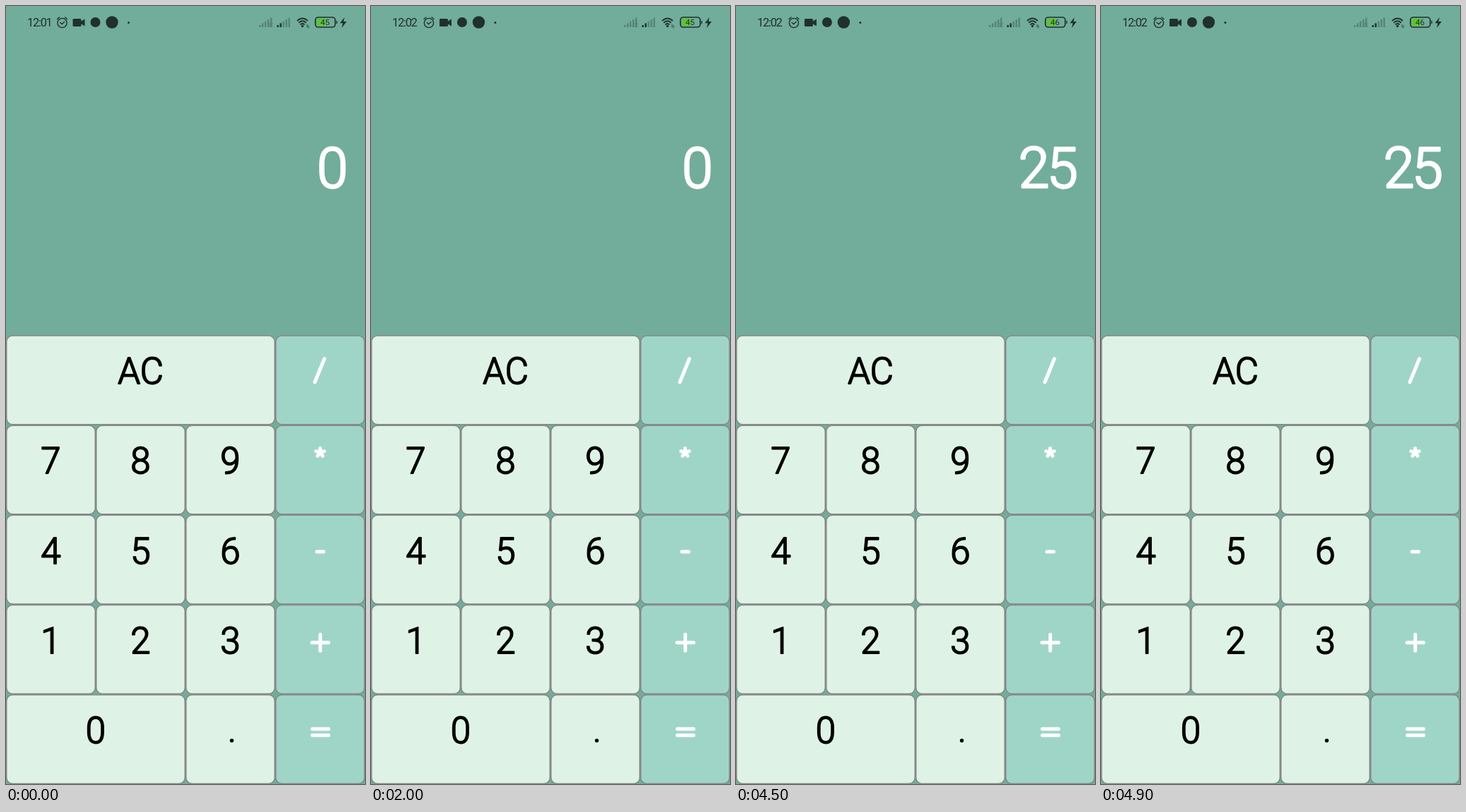
An HTML page that plays this animation: 508 px wide and 1102 px high, repeating every 5 s.

```html
<!DOCTYPE html>
<html lang="en">
<head>
<meta charset="utf-8">
<title>Calculator</title>
<style>
  html, body { margin: 0; width: 100%; height: 100%; overflow: hidden; background: #71ad9a; }
  svg { display: block; width: 100vw; height: 100vh; }
  text { font-family: Roboto, "Liberation Sans", sans-serif; font-weight: 300; }
  .face { stroke: #878787; stroke-width: 1.5; }
  .label { font-size: 51px; text-anchor: middle; fill: #000; stroke: #000; stroke-width: 1.8; stroke-linejoin: round; }
  .op { fill: none; stroke: #fff; stroke-width: 5; stroke-linecap: round; stroke-linejoin: round; }
  #display { font-size: 79px; text-anchor: end; letter-spacing: -3.4px; fill: #fff; stroke: #fff; stroke-width: 2.8; stroke-linejoin: round; }
  #clock { font-size: 16.5px; font-weight: 400; letter-spacing: -1.3px; }
  #charge { font-size: 11.5px; font-weight: 400; text-anchor: middle; }
  .ink { fill: #20312c; }
  .line { fill: none; stroke: #20312c; stroke-width: 1.4; stroke-linecap: round; stroke-linejoin: round; }
  .faint { fill: #548475; }
</style>
</head>
<body>
<svg id="stage" viewBox="0 0 508 1102" preserveAspectRatio="none">
  <rect width="508" height="1102" fill="#71ad9a"/>
  <g id="status">
    <text id="clock" class="ink" x="30" y="29"></text>
    <g id="icons">
      <g class="line">
        <circle cx="79.5" cy="24" r="6.6"/>
        <path d="M72.5 18.5L75.5 16M86.5 18.5L83.5 16M76.7 23.5L79.2 25.8L82.6 22.6"/>
      </g>
      <path class="ink" d="M96 18H105Q106.500 18 106.500 19.500V21.500L111.500 18.500V28.500L106.500 25.500V27.500Q106.500 29 105 29H96Q94.500 29 94.500 27.500V19.500Q94.500 18 96 18Z"/>
      <circle class="ink" cx="126.500" cy="23" r="7"/>
      <circle class="ink" cx="150" cy="23" r="8.700"/>
      <circle class="ink" cx="173.500" cy="23.500" r="1.500"/>
    </g>
    <g id="bars"></g>
    <path class="line" stroke-width="1" d="M373 25L377 29M377 25L373 29" style="stroke:#548475"/>
    <g class="line" stroke-linecap="butt">
      <path d="M412.500 20.500Q419.500 14.500 426.500 20.500M414.800 23.300Q419.500 19.300 424.200 23.300M417 26Q419.500 24 422 26" style="stroke-width:1.8"/>
      <path d="M426 26.500V30M428 27.500V31" style="stroke-width:.8"/>
    </g>
    <circle class="ink" cx="419.500" cy="28.500" r="1.700"/>
    <rect x="440" y="18" width="13" height="10" rx="2" fill="#5cc52d"/>
    <rect class="line" x="437.800" y="16" width="28" height="14" rx="4" style="stroke-width:1.7"/>
    <path class="line" d="M468 21.500V24.500"/>
    <text id="charge" class="ink" x="451.500" y="27"></text>
    <path class="ink" d="M479 16L472.500 24.200H476.500L475.200 31L482 22H477.600Z"/>
  </g>
  <text id="display" x="480.500" y="257"></text>
  <g id="keys"></g>
</svg>
<script>
const LOOP = 5000, COL = 127, ROW = 127.2, TOP = 466.2;
const $ = id => document.getElementById(id);

function add(parent, tag, attrs, text) {
  const el = document.createElementNS(parent.namespaceURI, tag);
  for (const name in attrs) el.setAttribute(name, attrs[name]);
  if (text) el.textContent = text;
  parent.append(el);
  return el;
}

// Operator strokes, relative to the middle of the label line.
const star = [0, 1, 2, 3, 4].map(i => {
  const a = (i * 72 - 90) * Math.PI / 180;
  return `M0 -11L${6 * Math.cos(a)} ${-11 + 6 * Math.sin(a)}`;
}).join('');
const strokes = {
  '/': 'M-7.500 16.500L6 -16.500',
  '*': star,
  '-': 'M-4.500 2.500H5',
  '+': 'M-11.500 4H12M.2 -7.500V15.500',
  '=': 'M-11 -1H12M-11 8H12'
};

const keys = {};
function addKey(name, col, row, span = 1) {
  const x = col * COL, y = TOP + row * ROW, w = span * COL;
  const isOp = name in strokes;
  const box = add($('keys'), 'g', {});
  const under = add(box, 'rect', { x, y, width: w, height: ROW, fill: '#000' });
  const face = add(box, 'g', {});
  add(face, 'rect', {
    class: 'face', x: x + .75, y: y + .75, width: w - 1.5, height: ROW - 1.5,
    rx: 8.5, fill: isOp ? '#9fd5c7' : '#def3e5'
  });
  const cx = x + w / 2;
  if (isOp) add(face, 'path', { class: 'op', d: strokes[name], transform: `translate(${cx} ${y + 50})` });
  else if (name === '.') add(face, 'circle', { cx: cx + 2, cy: y + 65.500, r: 2.7 });
  else add(face, 'text', { class: 'label', x: cx, y: y + 69 }, name);
  keys[name] = { under, face };
}

addKey('AC', 0, 0, 3);
['789', '456', '123'].forEach((line, r) => [...line].forEach((n, c) => addKey(n, c, r + 1)));
addKey('0', 0, 4, 2);
addKey('.', 2, 4);
[...'/*-+='].forEach((n, r) => addKey(n, 3, r));

function addBars(x, strong) {
  for (let i = 0; i < 5; i++) {
    const h = 3 + i * 2.6;
    add($('bars'), 'rect', { class: i < strong ? 'ink' : 'faint', x: x + i * 4, y: 30 - h, width: 2.4, height: h });
  }
}
addBars(358, 0);
addBars(383.5, 2);

const presses = [['2', 2300, 2400], ['5', 2800, 2900], ['-', 4600, 4700]];

function draw(t) {
  const late = t >= 1000;
  $('clock').textContent = late ? '12:02' : '12:01';
  $('icons').setAttribute('transform', `translate(${late ? 2.4 : 0} 0)`);
  $('charge').textContent = t < 4000 ? '45' : '46';
  $('display').textContent = t < 2400 ? '0' : t < 2900 ? '2' : '25';
  for (const name in keys) {
    const down = presses.some(([k, from, to]) => k === name && t >= from && t < to);
    keys[name].under.setAttribute('visibility', down ? 'visible' : 'hidden');
    keys[name].face.setAttribute('opacity', down ? .85 : 1);
  }
}

const start = performance.now();
function tick() {
  draw((performance.now() - start) % LOOP);
  requestAnimationFrame(tick);
}
tick();
</script>
</body>
</html>
```
